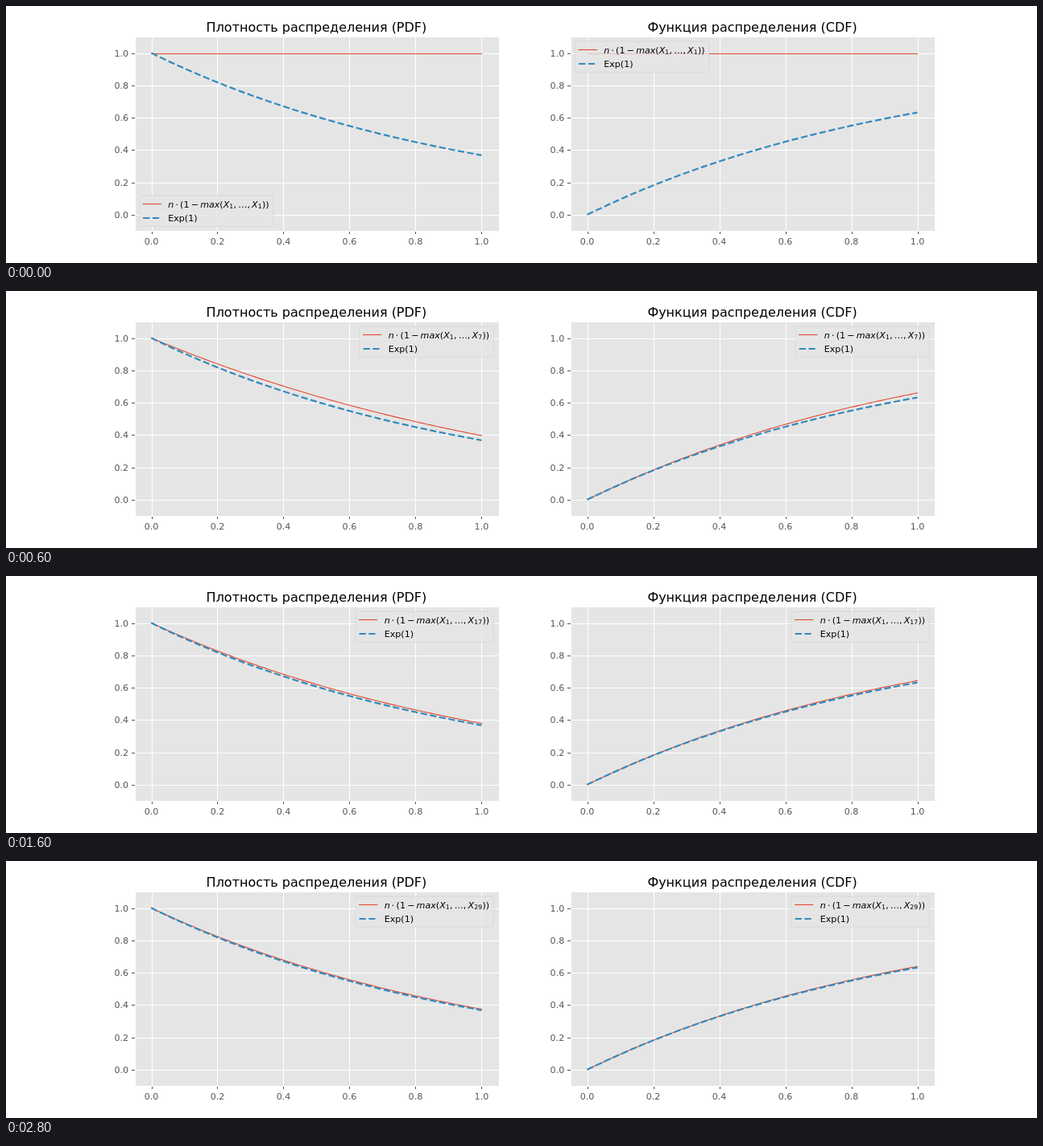
An HTML page that plays this animation: 1280 by 320 pixels, repeating every 2.9 s.

```html
<!DOCTYPE html>
<html lang="ru">
<head>
<meta charset="utf-8">
<title>PDF / CDF</title>
<style>
html, body { margin: 0; width: 100%; height: 100%; overflow: hidden; background: #fff; }
svg { display: block; width: 1280px; height: 320px; }
text { font: 11.11px "DejaVu Sans", sans-serif; white-space: pre; }
.title { font-size: 16px; text-anchor: middle; }
.tick { fill: #555; }
.mid { text-anchor: middle; }
.end { text-anchor: end; }
.it { font-style: italic; }
.sub { font-size: 7.78px; }
path { fill: none; }
.grid { stroke: #fff; }
.mark { stroke: #555; }
.red { stroke: #e24a33; stroke-width: 1.11; stroke-linecap: square; stroke-linejoin: round; }
.blue { stroke: #348abd; stroke-width: 2.22; stroke-dasharray: 8.22 3.56; stroke-linejoin: round; }
.box { fill: #e5e5e5; stroke: #ccc; stroke-width: .56; opacity: .8; }
</style>
</head>
<body>
<svg id="stage" viewBox="0 0 1280 320"></svg>
<script>
const STEP = 100, COUNT = 29;
const AXES_W = 450.91, UNIT_X = 409.92, UNIT_Y = 201.33, ZERO_Y = 259.87;
const stage = document.getElementById('stage');

function add(parent, tag, attrs = {}, content = '') {
  const el = document.createElementNS('http://www.w3.org/2000/svg', tag);
  for (const k in attrs) el.setAttribute(k, attrs[k]);
  el.textContent = content;
  return parent.appendChild(el);
}

const snap = v => Math.round(v) + 0.5;
const toY = v => ZERO_Y - UNIT_Y * v;

function curve(left, fn) {
  const pts = [];
  for (let i = 0; i < 100; i++) {
    const x = i / 99;
    pts.push((left + UNIT_X * x).toFixed(2) + ' ' + toY(fn(x)).toFixed(2));
  }
  return 'M' + pts.join('L');
}

// n·(1−max(X₁,…,Xₙ)); returns the last index's tspan
function formula(parent) {
  const text = add(parent, 'text', { x: 35.6, y: 14.5 });
  const part = (s, cls = '', dx = 0, dy = 0) => add(text, 'tspan', { class: cls, dx, dy }, s);
  part('n', 'it');
  part('\u22c5', '', 2.16);
  part('(1', '', 2.16);
  part('\u2212', '', 2.16);
  part('max', 'it', 2.16);
  part('(');
  part('X', 'it');
  part('1', 'sub', 0, 1.8);
  part(',', '', 0.3, -1.8);
  part('\u2026', '', 2.16);
  part(',');
  part('X', 'it', 2.16);
  const index = part('1', 'sub', 0, 1.8);
  part('))', '', 0.3, -1.8);
  return index;
}

function makePlot(left, title, limit, approx, firstSpot) {
  const g = add(stage, 'g');
  const x0 = left + 20.5, right = Math.round(left + AXES_W);
  const l = Math.round(left);
  add(g, 'rect', { x: l + 1, y: 39, width: right - l, height: 241, fill: '#e5e5e5' });
  for (let i = 0; i <= 5; i++) {
    const label = (i / 5).toFixed(1);
    const px = x0 + UNIT_X * i / 5, py = toY(i / 5);
    const gx = Math.floor(px + 0.5) + 0.5, gy = snap(py);
    add(g, 'path', { class: 'grid', d: `M${gx} 39V280M${l + 1} ${gy}H${right + 1}` });
    add(g, 'path', { class: 'mark', d: `M${gx} 281V284M${l - 4} ${gy}H${l}` });
    add(g, 'text', { class: 'tick mid', x: px, y: 297 }, label);
    add(g, 'text', { class: 'tick end', x: left - 7.8, y: gy + 3.5 }, label);
  }
  add(g, 'text', { class: 'title', x: left + AXES_W / 2, y: 32 }, title);
  const red = add(g, 'path', { class: 'red' });
  add(g, 'path', { class: 'blue', d: curve(x0, limit) });

  const legend = add(g, 'g');
  const box = add(legend, 'rect', { class: 'box', y: 0, height: 38.3, rx: 2.2 });
  add(legend, 'path', { class: 'red', d: 'M4.5 10.5H26.7' });
  add(legend, 'path', { class: 'blue', d: 'M4.5 28H26.7' });
  const index = formula(legend);
  add(legend, 'text', { x: 35.6, y: 32 }, 'Exp(1)');

  return n => {
    const flat = n === 1 && approx(1, 1) === 1;
    red.setAttribute('d', flat
      ? `M${x0} ${snap(toY(1))}H${x0 + UNIT_X}`
      : curve(x0, x => approx(x, n)));
    index.textContent = n;
    const width = n < 10 ? 166.3 : 171.3;
    box.setAttribute('width', width);
    const [x, y] = n === 1 ? firstSpot : [left + AXES_W - 5.55 - width, 44];
    legend.setAttribute('transform', `translate(${x} ${y})`);
  };
}

const plots = [
  makePlot(160, 'Плотность распределения (PDF)',
    x => Math.exp(-x), (x, n) => (1 - x / n) ** (n - 1), [165.6, 236]),
  makePlot(701.09, 'Функция распределения (CDF)',
    x => 1 - Math.exp(-x), (x, n) => 1 - (1 - x / n) ** n, [706.6, 44])
];

let shown = 0;
function draw() {
  const n = Math.floor(performance.now() / STEP) % COUNT + 1;
  if (n !== shown) plots.forEach(update => update(n));
  shown = n;
  requestAnimationFrame(draw);
}
draw();
</script>
</body>
</html>
```
